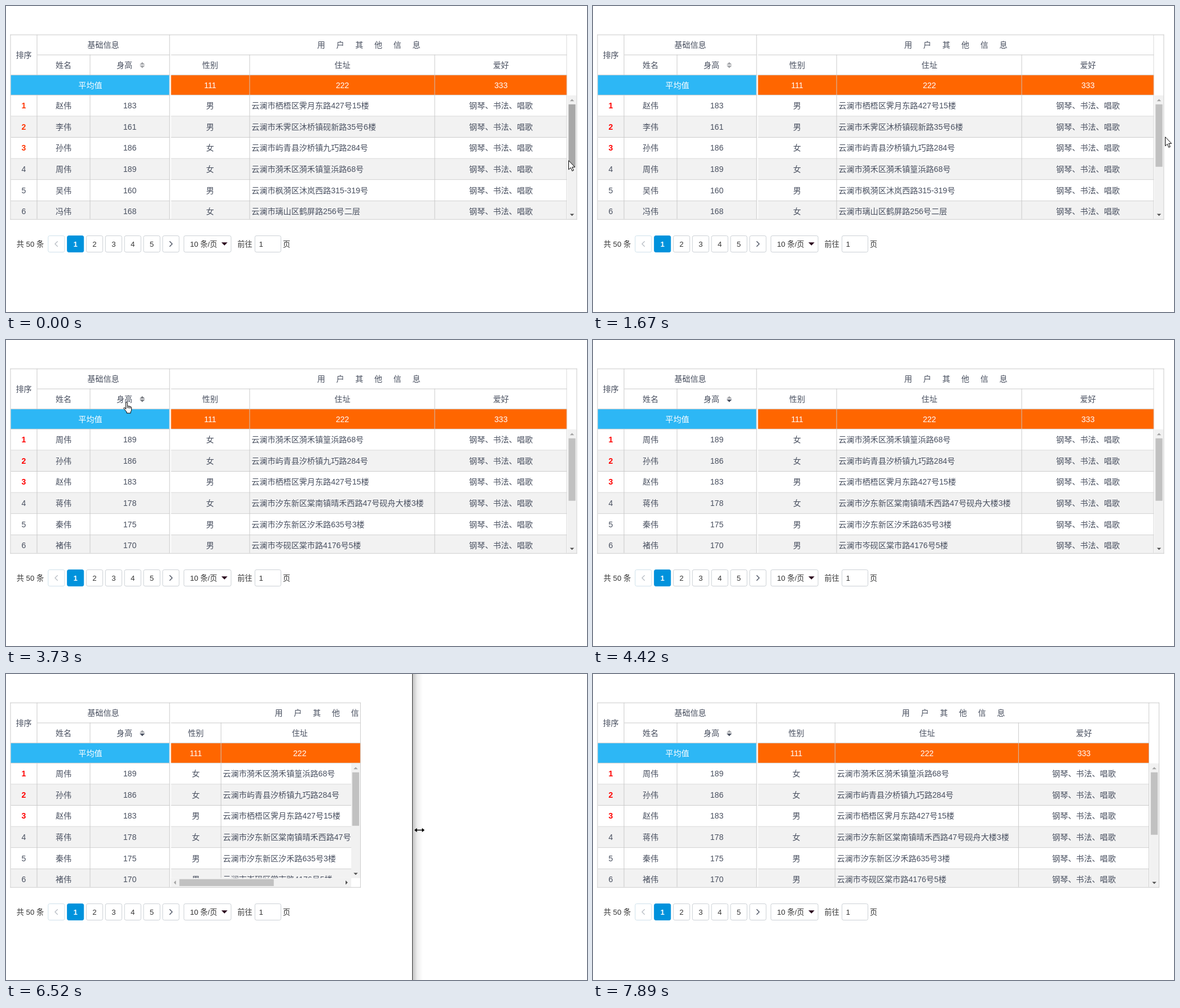
An HTML page for the animation above (8000 ms loop, 1030 by 544 pixels).

```html
<!DOCTYPE html>
<html lang="zh-CN">
<head>
<meta charset="utf-8">
<title>表格</title>
<style>
html, body { margin: 0; width: 100%; height: 100%; overflow: hidden; background: #fff; }
svg { display: block; }
text { font: 15px "Liberation Sans", "Noto Sans CJK SC", "Noto Sans CJK", sans-serif; fill: #495060; white-space: pre; }
.mid { text-anchor: middle; }
.page { font-size: 14px; fill: #333; }
.top { font-weight: bold; }
.white { fill: #fff; }
.on { fill: #fff; font-weight: bold; }
</style>
</head>
<body>
<svg width="1030" height="544" viewBox="0 0 1030 544">
  <defs>
    <linearGradient id="shade">
      <stop offset="0" stop-opacity=".24"/>
      <stop offset=".45" stop-opacity=".07"/>
      <stop offset="1" stop-opacity="0"/>
    </linearGradient>
  </defs>
  <!-- The page is laid out in whole pixels and shown at 94%. -->
  <g id="table" transform="scale(.94)"></g>
  <g id="pager" transform="scale(.94)"></g>
  <g id="overlay"></g>
</svg>
<script>
const LOOP = 8000, LINE = '#c8c8c8', FONT = 15;
const TOP = 54, BODY = 169, BOTTOM = 403, ROW = 40, COUNT = 10;
const MAX_SCROLL = ROW * COUNT - (BOTTOM - BODY);

const people = [
  ['赵伟', 183, '男', '云澜市栖梧区霁月东路427号15楼'],
  ['李伟', 161, '男', '云澜市禾霁区沐桥镇砚新路35号6楼'],
  ['孙伟', 186, '女', '云澜市屿青县汐桥镇九巧路284号'],
  ['周伟', 189, '女', '云澜市漪禾区漪禾镇篁浜路68号'],
  ['吴伟', 160, '男', '云澜市枫漪区沐岚西路315-319号'],
  ['冯伟', 168, '女', '云澜市璃山区鹤屏路256号二层'],
  ['蒋伟', 178, '女', '云澜市汐东新区棠南镇晴禾西路47号砚舟大楼3楼'],
  ['秦伟', 175, '男', '云澜市汐东新区汐禾路635号3楼'],
  ['褚伟', 170, '男', '云澜市岑砚区棠市路4176号5楼'],
  ['卫伟', 169, '男', '云澜市岚汀区砚禾镇屏云路517号东楼']
];
const rising = [...people].sort((a, b) => a[1] - b[1]);
const falling = [...rising].reverse();

const PALE = '#a2a4a8', HALF = '#7b7e84', DARK = '#495060';

// Each step keeps the settings of the one before it.
const steps = [
  [0, { rows: people, scroll: 0, thumb: '#a8a8a8', rank: '#ff3300', up: PALE, down: PALE,
        right: 1077, hover: -1, split: 0, cursor: ['arrow', 997, 274] }],
  [330, { thumb: '#787878', cursor: ['arrow', 998, 274] }],
  [630, { scroll: MAX_SCROLL, cursor: ['arrow', 1018, 354] }],
  [980, { cursor: ['arrow', 1019, 339] }],
  [1330, { scroll: 35, cursor: ['arrow', 1014, 290] }],
  [1670, { scroll: 0, thumb: '#c1c1c1', rank: '#ff0000', cursor: ['arrow', 1014, 232] }],
  [2020, { cursor: ['arrow', 235, 149] }],
  [2350, { cursor: ['hand', 195, 107] }],
  [2700, { rows: rising, up: HALF, down: HALF, cursor: ['hand', 201, 112] }],
  [3050, { up: DARK, down: PALE, cursor: ['hand', 210, 116] }],
  [3380, { cursor: ['hand', 208, 110] }],
  [3730, { rows: falling, up: HALF, down: HALF }],
  [4070, { up: PALE, down: DARK, hover: 0, cursor: ['arrow', 300, 190] }],
  [4420, { hover: -1, cursor: null }],
  [5800, { right: 912, split: 911, cursor: ['resize', 910, 264.5] }],
  [6150, { right: 692, split: 736, cursor: ['resize', 737, 271.5] }],
  [6520, { right: 669, split: 720, cursor: ['resize', 733, 277.5] }],
  [6840, { right: 851, split: 994, cursor: ['resize', 996, 277.5] }],
  [7180, { right: 997, split: 0, cursor: null }],
  [7520, { right: 1058 }],
  [7890, { right: 1068 }]
];
const states = [];
for (const [at, change] of steps) states.push({ ...states.at(-1), at, ...change });

const rect = (x, y, w, h, fill) => `<rect x="${x}" y="${y}" width="${w}" height="${h}" fill="${fill}"/>`;
const vline = (x, y1, y2) => rect(x, y1, 1, y2 - y1, LINE);
const hline = (x1, x2, y) => rect(x1, y, x2 - x1, 1, LINE);
const text = (x, y, s, cls = '', more = '') =>
  `<text x="${x}" y="${y + 5.3}" class="${cls}" ${more}>${s}</text>`;
const mid = (x, y, s, cls = '', more = '') => text(x, y, s, 'mid ' + cls, more);
const clip = (x, y, w, h, inner) =>
  `<svg x="${x}" y="${y}" width="${w}" height="${h}" viewBox="${x} ${y} ${w} ${h}">${inner}</svg>`;
const tri = (x, y, w, h, turn, fill) =>
  `<path transform="translate(${x} ${y}) rotate(${turn})" d="M${-w / 2} ${h / 2}H${w / 2}L0 ${-h / 2}Z" fill="${fill}"/>`;

const charWidth = c => c > '\u2fff' || c === '…' ? 1 : c === '-' ? .333 : .556;
const textWidth = s => [...s].reduce((w, c) => w + charWidth(c), 0) * FONT;
function fit(s, room) {
  if (textWidth(s) <= room) return s;
  while (textWidth(s + '…') > room) s = s.slice(0, -1);
  return s + '…';
}

// Calls draw(person, index, middle) for every row, over its background.
function rowsOf(s, x1, x2, draw) {
  return s.rows.map((p, i) => {
    const y = BODY + ROW * i - s.scroll;
    const fill = i === s.hover ? '#eee' : i % 2 ? '#f2f2f2' : '#fff';
    return rect(x1, y, x2 - x1, ROW, fill) + hline(x1, x2, y + ROW - 1) + draw(p, i, y + 19.5);
  }).join('');
}

function leftTable(s) {
  const body = rowsOf(s, 9, 309, (p, i, y) =>
    (i < 3 ? mid(33.5, y, i + 1, 'top', `style="fill:${s.rank}"`) : mid(33.5, y, i + 1)) +
    mid(108.5, y, p[0]) + mid(233.5, y, p[1])) + vline(58, BODY, BOTTOM) + vline(158, BODY, BOTTOM);
  return mid(33.5, 92.5, '排序') + mid(183.5, 73.5, '基础信息') + mid(108.5, 111.5, '姓名') +
    mid(223.5, 111.5, '身高') + tri(257, 108.5, 10, 5, 0, s.up) + tri(257, 115, 10, 5, 180, s.down) +
    vline(58, TOP, 131) + vline(158, 92, 131) + hline(59, 309, 92) + hline(9, 309, 130) +
    rect(9, 131, 299, 37, '#2db7f5') + hline(9, 309, 168) + mid(159, 149.5, '平均值', 'white') +
    clip(9, BODY, 300, BOTTOM - BODY, body) + vline(308, TOP, BOTTOM);
}

function rightTable(s) {
  const slim = s.right < 912;
  const delta = slim ? -54 : (s.right - 1079) / 3;
  const a = 310, left = 311, d = Math.round(a + 750 + 3 * delta);
  const b = Math.ceil(a + 150 + delta), c = Math.ceil(a + 500 + 2 * delta);
  const floor = slim ? BOTTOM - 17 : BOTTOM;
  const headEnd = slim ? s.right - 1 : d, bodyEnd = slim ? s.right - 18 : d;
  const centers = [(a + b) / 2, (b + c) / 2, (c + d) / 2];
  const trio = (y, words, cls) => words.map((w, i) => mid(centers[i], y, w, cls)).join('');

  const head = hline(left, d, 92) + hline(left, d, 130) + trio(111.5, ['性别', '住址', '爱好']) +
    text((a + d) / 2 - 97, 73.5, '用户其他信息', '', 'letter-spacing="20.9"') +
    rect(left, 131, d - left, 37, '#ff6600') + hline(left, d, 168) +
    vline(b - 1, 92, BODY) + vline(c - 1, 92, BODY) + vline(d - 1, TOP, BODY) +
    trio(149.5, ['111', '222', '333'], 'white');
  const body = rowsOf(s, left, d, (p, i, y) =>
    mid(centers[0], y, p[2]) + text(b + 3, y, fit(p[3], c - b - 6)) + mid(centers[2], y, '钢琴、书法、唱歌')) +
    [b, c, d].map(x => vline(x - 1, BODY, BOTTOM)).join('');

  return clip(left, TOP, headEnd - left, BODY - TOP, head) +
    clip(left, BODY, bodyEnd - left, floor - BODY, body) +
    scrollbars(s, slim, floor, d - a);
}

function scrollbars(s, slim, floor, full) {
  const x = s.right - 18, view = floor - BODY, track = view - 34;
  const size = Math.ceil(track * view / (ROW * COUNT)) + 1, travel = s.scroll / MAX_SCROLL;
  const off = '#a3a3a3', on = '#505050';
  let out = rect(x, BODY, 17, view, '#f1f1f1') +
    rect(x + 2, BODY + 17 + Math.round(travel * (track - size)), 13, size, s.thumb) +
    tri(x + 8.5, BODY + 9, 8, 4, 0, travel ? on : off) +
    tri(x + 8.5, floor - 8, 8, 4, 180, travel === 1 ? off : on);
  if (slim) {
    const start = 310, wide = x - start;
    out += rect(start + 1, floor, wide - 1, 17, '#f1f1f1') +
      rect(start + 17, floor + 2, Math.round((wide - 34) * wide / full), 13, '#c1c1c1') +
      tri(start + 8.5, floor + 8.5, 8, 4, -90, off) + tri(x - 8.5, floor + 8.5, 8, 4, 90, on);
  }
  return out;
}

const border = s => hline(8, s.right, TOP) + hline(8, s.right, BOTTOM) +
  vline(8, TOP, BOTTOM + 1) + vline(s.right - 1, TOP, BOTTOM + 1);

function pager() {
  const grey = '#c8cdd3', blue = '#0092dc', y = 450;
  const box = (x, w, stroke = grey, fill = '#fff') =>
    `<rect x="${x + .5}" y="434.5" width="${w - 1}" height="31" rx="3" fill="${fill}" stroke="${stroke}"/>`;
  const chevron = (x, dir, c) =>
    `<path d="M${x - 2.5 * dir} ${y - 5}l${5 * dir} 5l${-5 * dir} 5" fill="none" stroke="${c}" stroke-width="1.4"/>`;
  let out = text(20, y, '共 50 条', 'page') + box(79, 32, '#cbdfea') + chevron(95, -1, '#b8bec5');
  for (let i = 1; i <= 5; i++) {
    const x = 79 + 36 * i;
    out += (i === 1 ? box(x, 32, blue, blue) : box(x, 32)) + mid(x + 16, y + .5, i, i === 1 ? 'page on' : 'page');
  }
  return out + box(295, 32) + chevron(311, 1, '#495060') +
    box(335, 90) + text(347, y + .5, '10 条/页', 'page') + tri(412, y, 11.5, 6, 180, '#2b0a1e') +
    text(436.500, y, '前往', 'page') + box(469, 50) + text(477, y, '1', 'page') + text(522, y, '页', 'page');
}

const shapes = {
  arrow: ['M.5 .8V16.8L4.2 13.4L6.7 19.3L9.2 18.2L6.7 12.4H11.6Z', '#fff', '#000'],
  hand: ['M4.5 13V2a1.4 1.4 0 0 1 2.8 0V7.5q1.4-.9 2.4.4q1.5-.7 2.4.6q2-.3 2.4 1.5V14q0 2-1.5 3.6V20H6V18L1 12q-.6-1.8 1-2q1.5 .5 2.5 3ZM7.3 7.5V11M9.7 8V11.5M12.1 8.5V12', '#fff', '#000'],
  resize: ['M-9 0l4.500-3.800v3h9v-3l4.500 3.800-4.500 3.800v-3h-9v3z', '#000', 'none']
};
function overlay(s) {
  let out = '';
  if (s.split) out = rect(s.split, 0, 1030 - s.split, 544, '#fff') +
    rect(s.split + 1, 0, 18, 544, 'url(#shade)') + rect(s.split, 0, 1, 544, '#333');
  if (s.cursor) {
    const [kind, x, y] = s.cursor, [d, fill, stroke] = shapes[kind];
    out += `<path transform="translate(${x} ${y})" d="${d}" fill="${fill}" stroke="${stroke}" stroke-linejoin="round"/>`;
  }
  return out;
}

const get = id => document.getElementById(id);
get('pager').innerHTML = pager();
let shown = null;
function tick() {
  const t = performance.now() % LOOP;
  const s = states.findLast(v => v.at <= t);
  if (s !== shown) {
    shown = s;
    get('table').innerHTML = leftTable(s) + rightTable(s) + border(s);
    get('overlay').innerHTML = overlay(s);
  }
  requestAnimationFrame(tick);
}
tick();
</script>
</body>
</html>
```
